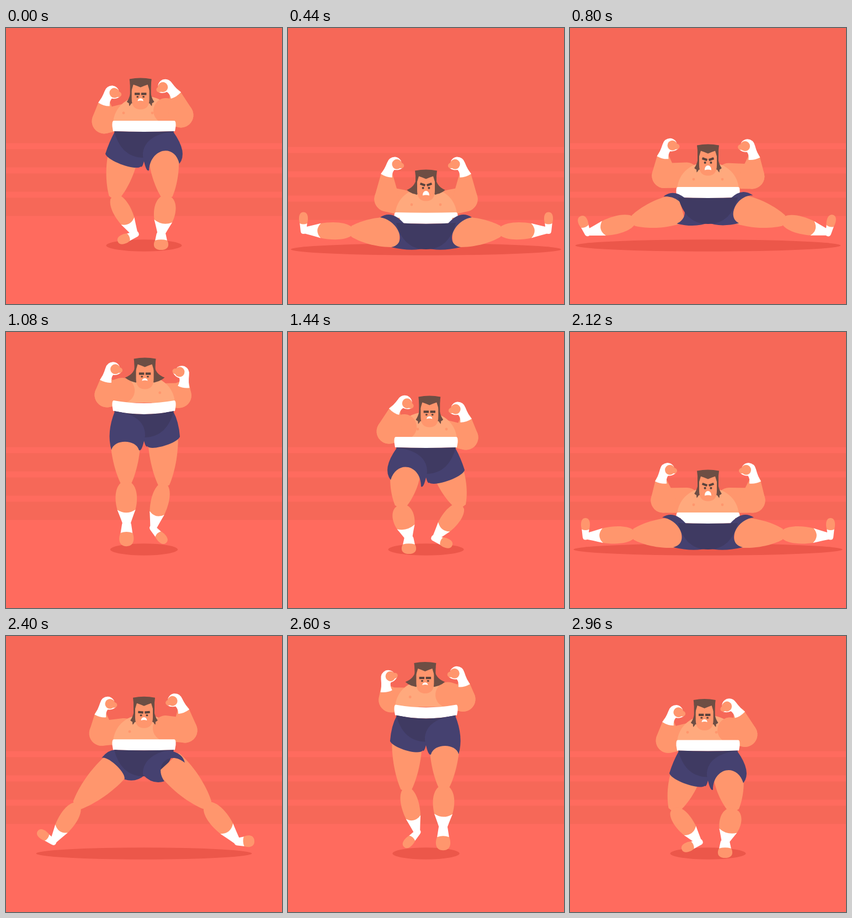
Animation of 500 by 500 pixels, one loop 3 s. Source, as an HTML page:

```html
<!DOCTYPE html>
<html lang="en">
<head>
<meta charset="utf-8">
<title>Wrestler splits</title>
<style>
html, body { margin: 0; width: 100%; height: 100%; overflow: hidden; background: #ff6b5e; }
svg { display: block; width: 100vw; height: 100vh; }
</style>
</head>
<body>
<svg id="stage" viewBox="0 0 500 500"></svg>
<script>
const HALF = 1500, CX = 250, BAND = 20;
const HIGH = 124, LOW = 190, SPRUNG = 145, SEATED = 327;
const C = {
  floor: '#ff6b5e', wall: '#f66858', shadow: '#ec574a', skin: '#ff966d', chest: '#ffa97d',
  shorts: '#454170', belly: '#3f3a62', hair: '#6d4e44', brow: '#5a433c', white: '#fff'
};

const clamp = x => Math.max(0, Math.min(1, x));
const lerp = (a, b, k) => a + (b - a) * k;
const smooth = x => { x = clamp(x); return x * x * (3 - 2 * x); };
const add = (p, x, y) => [p[0] + x, p[1] + y];
const mix = (p, q, k) => [lerp(p[0], q[0], k), lerp(p[1], q[1], k)];
const arcX = q => Math.sin(q * Math.PI / 2);
const arcY = q => 1 - Math.cos(q * Math.PI / 2);
// Joints travel on an arc so that the legs keep their length.
const swing = (p, q, k) => [lerp(p[0], q[0], arcX(k)), lerp(p[1], q[1], arcY(k))];

// Body for v in [-60, 1440): spring up, drop into the split, rise, hop, crouch.
function bodyAt(v) {
  let y, split = 0;
  if (v < 80) {
    y = lerp(LOW, SPRUNG, smooth(clamp((v + 46) / 116) ** .78));
  } else if (v < 400) {
    split = ((v - 80) / 320) ** 1.4;
    y = lerp(SPRUNG, SEATED, arcY(split));
  } else if (v < 1090) {
    split = 1 - smooth((v - 720) / 370);
    y = lerp(HIGH, SEATED, arcY(split));
  } else {
    y = lerp(HIGH, LOW, smooth((v - 1090) / 210)) + 6 * Math.sin(Math.PI * clamp((v - 1300) / 140));
  }
  const landed = v > 560;
  const lift = v < 1090 ? smooth((v - 940) / 150) : 1 - smooth((v - 1090) / 125);
  const shake = 7 * Math.sin(Math.PI * Math.sqrt(clamp((v - 400) / 160)));
  return {
    y, split, lift, shake, landed,
    crouch: (y - HIGH) / (LOW - HIGH) * (1 - split),
    reach: split * (1 - smooth((v - 440) / 140)) * !(v > 700),
    front: v < 130 ? 'b' : v > 860 ? 'a' : '',
    turn: landed ? .25 * smooth((v - 900) / 190) + .75 * smooth((v - 1090) / 230) : split - 1,
    anger: smooth(2 * split - .7),
    sag: 5 * lift + .1 * shake,
    flare: .2 + .8 * lift + .1 * shake
  };
}

// Joints of one side. x grows outwards; arm y starts at the band top, hip and
// hem y at the band bottom, knee and ankle y at the stage top.
// out is 1 on the turned out side and 0 on the side nearer to the viewer.
function sideAt(s, out) {
  const near = 1 - out, { split, lift, reach, crouch } = s;

  const shoulder = mix(out ? [33, -8] : [40, -18], [38, -22], split);
  const elbow = mix(out ? [72 - 9 * lift, 1 - 10 * lift] : [67, -10], [81, -22], split);
  const wrist = mix(out ? [72, -31 + 5 * lift] : [57 + 12 * lift, -47 + 11 * lift], [85, -56], split);
  const arm = [add(shoulder, 5 * reach, 4 * reach), add(elbow, -10 * reach, -2 * reach), add(wrist, -14 * reach, -12 * reach)];

  const bottom = s.y + BAND;
  const hip = add(swing([34, 25], [48, 16], split), 0, bottom);
  const ankle = swing([31 - 15 * out, 374 - lift * (25 - 7 * out)], [222, 370 - 1.5 * s.shake], split);
  const bend = (14 * crouch + out * (12 + 13 * crouch)) * (1 - split);
  const knee = add(mix(hip, ankle, .58 - .08 * split), bend, 0);
  const foot = {
    angle: lerp(90 - out * (68 - 26 * lift), -90, split) * Math.PI / 180,
    length: lerp(28 + 6 * out + lift * (11 - 10 * out), 33, split),
    width: lerp(13 - 4.5 * out, 8, split)
  };

  // The hem arches along the thigh: towards the hip on the near side, away on the other.
  const axis = Math.atan2(knee[1] - hip[1], knee[0] - hip[0]);
  const arch = lerp(near * (39 - 19 * lift) - 11 * out, 32, split);
  const outer = mix([64 + 6 * out - 5 * lift, 58 - 18 * out + lift * (12 - 6 * out)], [83, -11], split);
  const inner = mix([9 - 3 * out, 70 - 7 * out], [63, 43], split);
  const arched = t => add(mix(outer, inner, t), -arch * Math.cos(axis), -arch * Math.sin(axis));
  const hem = {
    waist: [lerp(53, 40, split), 0],
    bulge: mix([63 + near * (17 - 12 * lift), 18 + 20 * near], [62, -25], split),
    outer, inner, high: arched(.1), low: arched(.9),
    under: [inner[0] * .4, inner[1] + 4 + 5 * split]
  };
  return { arm, hip, knee, ankle, foot, hem };
}

const f = n => n.toFixed(2);
const path = (d, fill) => `<path d="${d}" fill="${fill}"/>`;
const rect = (x, y, w, h, fill) => `<rect x="${x}" y="${y}" width="${w}" height="${h}" fill="${fill}"/>`;
const oval = (x, y, rx, ry, fill) => `<ellipse cx="${f(x)}" cy="${f(y)}" rx="${f(rx)}" ry="${f(ry)}" fill="${fill}"/>`;
const group = (transform, ...parts) => `<g transform="${transform}">${parts.join('')}</g>`;
const bothSides = parts => group('scale(-1 1)', parts) + parts;

// Outline around two circles, the first not smaller than the second.
function capsule([x1, y1], r1, [x2, y2], r2, fill) {
  const th = Math.atan2(y2 - y1, x2 - x1);
  const open = Math.acos(Math.min(1, (r1 - r2) / Math.hypot(x2 - x1, y2 - y1)));
  const at = (x, y, r, t) => f(x + r * Math.cos(t)) + ',' + f(y + r * Math.sin(t));
  return path(`M${at(x1, y1, r1, th + open)}A${r1},${r1} 0 1 1 ${at(x1, y1, r1, th - open)}` +
    `L${at(x2, y2, r2, th - open)}A${r2},${r2} 0 0 1 ${at(x2, y2, r2, th + open)}Z`, fill);
}

// Template pairs are: share of the way from p to q, distance across.
function along([px, py], [qx, qy], wide, template, fill) {
  const dx = qx - px, dy = qy - py, len = Math.hypot(dx, dy) || 1;
  const d = template.replace(/(-?[\d.]+),(-?[\d.]+)/g, (_, t, w) => {
    const s = w * wide / len;
    return f(px + dx * t - dy * s) + ',' + f(py + dy * t + dx * s);
  });
  return path(d, fill);
}

function drawArm({ arm }, sign, y) {
  const [shoulder, elbow, wrist] = arm.map(([px, py]) => [CX + sign * px, y + py]);
  const lean = Math.atan2(arm[1][0] - arm[2][0], arm[1][1] - arm[2][1]) * 180 / Math.PI + 4;
  return capsule(shoulder, 23, elbow, 22.5, C.skin) + capsule(elbow, 22.5, wrist, 10.5, C.skin) +
    group(`translate(${wrist.map(f)}) scale(${-sign} 1) rotate(${f(lean)})`,
      path('M-11,-1Q-5,-9 -1,-22Q2,-33 13,-33.5Q20,-33 24,-27L27,-14Q21,-9 13,-10Q9,-5 10,4Q0,5 -11,-1Z', C.white),
      oval(17, -20.5, 9, 9, C.skin), oval(24.5, -18.5, 5.5, 5, C.skin));
}

function drawLeg(side, sign, bottom) {
  const { angle, length, width } = side.foot;
  const toes = add(side.ankle, length * Math.cos(angle), length * Math.sin(angle));
  const [hip, knee, ankle, toe] = [side.hip, side.knee, side.ankle, toes].map(([x, y]) => [CX + sign * x, y]);
  const calf = .5 + .5 * width / 13;
  return along(hip, knee, 1, 'M0,-26C.4,-31 .8,-20 1,-10Q1.06,0 1,10C.8,20 .4,31 0,26Z', C.skin) +
    along(knee, ankle, calf, 'M0,-10C.12,-20 .38,-22 .66,-16L.9,0L.66,16C.38,22 .12,20 0,10Q-.08,0 0,-10Z', C.skin) +
    along(knee, ankle, calf, 'M.64,-16.5Q.78,0 .64,16.5Q.86,10 1,6.5L1,-6.5Q.86,-10 .64,-16.5Z', C.white) +
    along(ankle, toe, width, 'M.42,-.85L-.02,-.65Q-.2,-.6 -.2,0Q-.2,.6 -.02,.65L.42,.85Z', C.white) +
    along(ankle, toe, width, 'M.38,-.83C.5,-1.05 1,-1.3 1,0C1,1.3 .5,1.05 .38,.83Q.28,0 .38,-.83Z', C.skin) +
    drawShorts(side.hem, sign, bottom);
}

function drawShorts(hem, sign, bottom) {
  const p = ([x, y]) => f(CX + sign * x) + ',' + f(bottom + y);
  return path(`M${p(hem.waist)}Q${p(hem.bulge)} ${p(hem.outer)}C${p(hem.high)} ${p(hem.low)} ${p(hem.inner)}` +
    `Q${p(hem.under)} ${p([-2, 44])}C${p([-3, 15])} ${p([25, 2])} ${p(hem.waist)}Z`, C.shorts);
}

function drawHead(x, y, { anger, flare }) {
  const m = 5 + anger, low = 42 + 5 * anger;
  const hair = path(`M17,10Q17,${f(34 - 5 * flare)} ${f(22 + 14 * flare)},${f(45 - 9 * flare)}` +
      `Q${f(20 + 6 * flare)},${f(49 - 4 * flare)} 12,45Z`, C.hair) +
    path(`M19,8L19,36Q22,45 ${f(21 - 3 * flare)},${f(53 - 9 * flare)}Q17,48 13,38L13,12Z`, C.hair);
  const eye = group(`translate(6 ${f(29 - 2 * anger)}) rotate(${f(-20 * anger)})`,
      rect(-4.7, -2.1, 9.4, 4.2, C.brow)) + oval(5.4, 34.3 - anger, 2, 1.6 + .5 * anger, C.brow);
  return group(`translate(${f(x)} ${f(y)})`, bothSides(hair),
    path('M-16,10H16V38Q16,57 0,57Q-16,57 -16,38Z', C.skin),
    path('M-20,2Q0,-2 20,2Q18.5,14 17.5,27L13,12Q7,14 0,17Q-7,14 -13,12L-17.5,27Q-18.5,14 -20,2Z', C.hair),
    bothSides(eye),
    path(`M${-m},${low}C${-m},35.6 ${m},35.6 ${m},${low}Q0,${low - 2} ${-m},${low}Z`, C.white));
}

function drawTorso(y, turn) {
  return group(`translate(${CX} ${f(y)})`,
    path('M-56,4C-54,-26 -29,-45 0,-45C29,-45 54,-26 56,4Z', C.chest),
    oval(11 * turn - 26, -14, 2.4, 2.4, C.skin), oval(11 * turn + 26, -14, 2.4, 2.4, C.skin));
}

function drawBand(y, sag) {
  const bend = f(sag * 2), end = f(BAND + 1 + sag * 2);
  return group(`translate(${CX} ${f(y)})`,
    path(`M-55,0Q0,${bend} 55,0Q58,0 57.5,10L56,19Q0,${end} -56,19L-57.5,10Q-58,0 -55,0Z`, C.white));
}

function drawBelly(bottom, sag) {
  return group(`translate(${CX} ${f(bottom)})`,
    path(`M-54,-1Q0,${f(sag * 2 + 1)} 54,-1C46,28 30,47 0,47C-30,47 -46,28 -54,-1Z`, C.belly));
}

const stage = document.getElementById('stage');

// Each half of the loop is the mirror image of the other.
function render(t) {
  const shifted = t + 60;
  const dir = Math.floor(shifted / HALF) % 2 ? -1 : 1;
  const s = bodyAt(shifted % HALF - 60);
  const bottom = s.y + BAND, turn = s.turn * dir;
  const sides = { a: [sideAt(s, s.landed ? 0 : 1), -dir], b: [sideAt(s, s.landed ? 1 : 0), dir] };
  const fronts = s.front ? [s.front] : [];
  const backs = ['a', 'b'].filter(k => k !== s.front);
  const arms = list => list.map(k => drawArm(...sides[k], s.y)).join('');
  const legs = list => list.map(k => drawLeg(...sides[k], bottom)).join('');
  const headDrop = 3 * smooth((s.y - 168) / 22) * Math.abs(s.turn);

  stage.innerHTML = rect(0, 0, 500, 500, C.floor) + group(`translate(0 ${f(s.shake)})`,
    rect(0, -20, 500, 360.5, C.wall),
    ...[0, 1, 2].map(i => rect(0, 208.5 + 44 * i, 500, 11, C.floor)),
    oval(CX, 394, lerp(68.5 - 8 * s.lift, 243.5 + .2 * s.shake, arcX(s.split)), 10.7, C.shadow),
    arms(backs), drawTorso(s.y, turn), arms(fronts),
    drawBand(s.y, s.sag), legs(backs), drawBelly(bottom, s.sag), legs(fronts),
    drawHead(CX + 6.3 * turn, s.y - 77.5 + headDrop, s));
}

const start = performance.now();
function tick() {
  render((performance.now() - start) % (2 * HALF));
  requestAnimationFrame(tick);
}
render(0);
requestAnimationFrame(tick);
</script>
</body>
</html>
```
